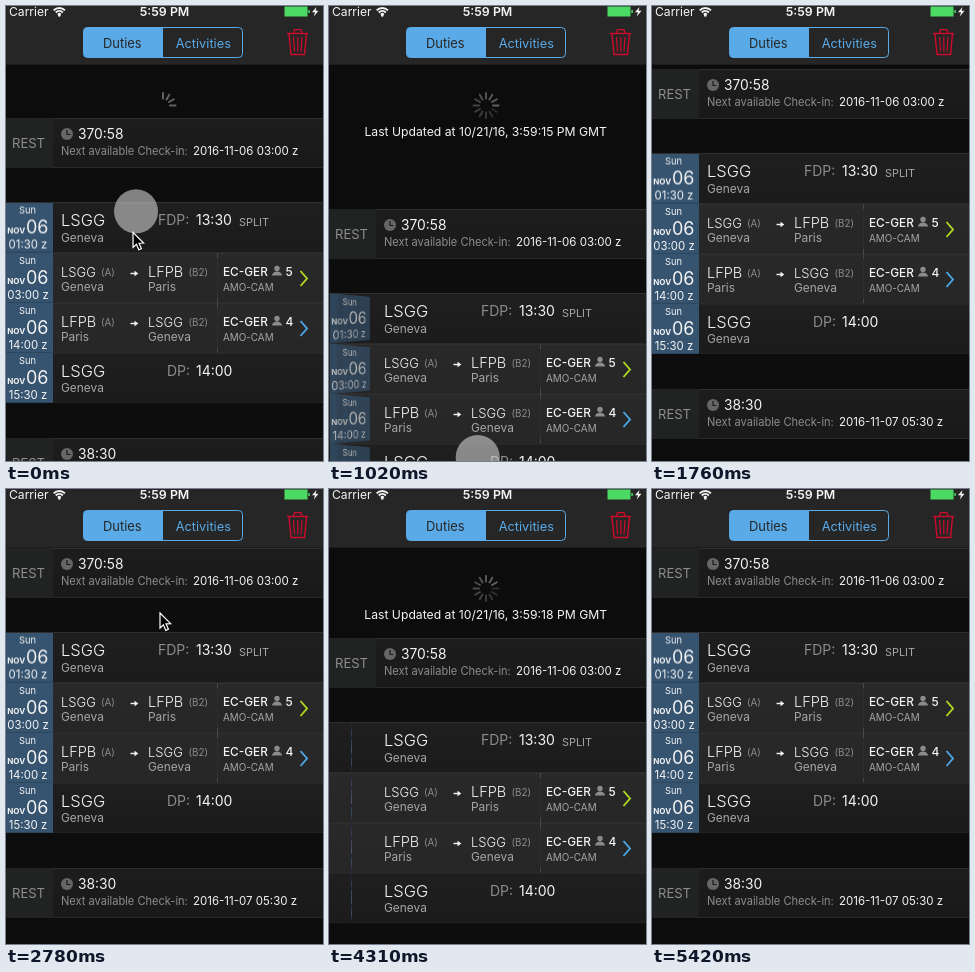
Recreate the animation shown at these times as an HTML page with a canvas. Size 317 by 455 pixels, loop 5960 ms.

```html
<!DOCTYPE html>
<html lang="en">
<head>
<meta charset="utf-8">
<title>Duties</title>
<style>
  html, body { margin: 0; width: 100%; height: 100%; overflow: hidden; background: #0c0c0c; }
  canvas { display: block; width: 317px; height: 455px; }
</style>
</head>
<body>
<canvas id="stage"></canvas>
<script>
const W = 317, H = 455, LOOP = 5960, TOP = 59;
const FONT = 'Inter, Roboto, "Liberation Sans", sans-serif';
const BLUE = '#5aaae7', WHITE = '#f4f4f4', GRAY = '#8c8c8c', SOFT = '#a6a6a6';
const BADGE_W = 47, BADGE_H = 50, AXIS = 22.5;
const dpr = Math.max(1, window.devicePixelRatio || 1);

function makeCanvas(el, w, h) {
  el.width = w * dpr;
  el.height = h * dpr;
  const c = el.getContext('2d');
  c.scale(dpr, dpr);
  return c;
}
const stage = makeCanvas(document.getElementById('stage'), W, H);
let g = stage;

// ---- drawing helpers ----
function text(s, x, y, size, color = WHITE, weight = 400, align = 'left') {
  g.font = `${weight} ${size}px ${FONT}`;
  g.fillStyle = color;
  g.textAlign = align;
  g.fillText(s, x, y);
}
function box(x, y, w, h, color) {
  g.fillStyle = color;
  g.fillRect(x, y, w, h);
}
function trace(points, closed) {
  g.beginPath();
  points.forEach(([x, y], i) => i ? g.lineTo(x, y) : g.moveTo(x, y));
  if (closed) g.closePath();
}
function line(points, color, width) {
  trace(points);
  g.strokeStyle = color;
  g.lineWidth = width;
  g.stroke();
}
function disc(x, y, r, color) {
  g.beginPath();
  g.arc(x, y, r, 0, Math.PI * 2);
  g.fillStyle = color;
  g.fill();
}

// ---- motion ----
const clamp = v => Math.min(1, Math.max(0, v));
const smooth = u => u * u * (3 - 2 * u);
const rubber = d => { const k = d * 0.55 / 396; return 396 * k / (1 + k); };
const settle = dt => (1 + 0.0105 * dt) * Math.exp(-0.0105 * dt);

const pulls = [
  { start: 0, end: 1245, spin: 690, flip: 920, from: 111, span: 321,
    ease: u => 1 - Math.pow(1 - u, 1.6),
    touch: p => [130 + 20 * p, 205 + 263 * p],
    arrow: p => [127 + 20 * p, 226 + 310 * p] },
  { start: 3450, begin: 3500, end: 4200, spin: 4100, flip: 4100, from: 0, span: 364,
    ease: u => Math.pow(u, 1.72),
    touch: p => [159 + 15 * p, 100 + 325 * p],
    arrow: p => [157 + 15 * p, 100 + 417 * p] }
];
const FLIP_TIME = 420;

function progress(pull, t) {
  const begin = pull.begin || pull.start;
  return pull.ease(clamp((t - begin) / (pull.end - begin)));
}
function offsetAt(pull, t) {
  const d = rubber(pull.from + pull.span * progress(pull, t));
  return t > pull.end ? d * settle(t - pull.end) : d;
}

// time, x, y of the free pointer
const path = [
  [1790, 172, 458], [1880, 168, 408], [2000, 164, 379], [2180, 164, 379],
  [2360, 144, 213], [2540, 144, 213], [2780, 154, 124], [3140, 154, 124],
  [3320, 157, 100], [3500, 157, 100]
];
function pointerAt(t, pull) {
  if (t >= 5040 && t < 5420) return [198, 444];
  if (t >= (pull.begin || pull.start) && t < pull.end) return pull.arrow(progress(pull, t));
  for (let i = 1; i < path.length; i++) {
    const [t0, x0, y0] = path[i - 1], [t1, x1, y1] = path[i];
    if (t >= t0 && t < t1) {
      const u = (t - t0) / (t1 - t0);
      return [x0 + (x1 - x0) * u, y0 + (y1 - y0) * u];
    }
  }
  return null;
}

// ---- date badges ----
const badges = ['01:30 z', '03:00 z', '14:00 z', '15:30 z'].map(time => {
  const el = document.createElement('canvas');
  return { el, time, ctx: makeCanvas(el, BADGE_W, BADGE_H) };
});
function paintBadges() {
  for (const b of badges) {
    g = b.ctx;
    box(0, 0, BADGE_W, BADGE_H, '#365470');
    box(0, BADGE_H - 1, BADGE_W, 1, '#2c465e');
    text('Sun', 21.5, 10.7, 9.3, WHITE, 400, 'center');
    text('NOV', 1.2, 31, 8, WHITE, 700);
    text('06', 20, 31, 18, WHITE, 400);
    text(b.time, 22, 45.5, 11.4, WHITE, 400, 'center');
  }
  g = stage;
}

// Y-axis flip, drawn as thin vertical strips
function badge(i, y, angle) {
  const { el } = badges[i];
  if (!angle) {
    g.drawImage(el, 0, y, BADGE_W, BADGE_H);
    return;
  }
  const a = angle > Math.PI / 2 ? angle - Math.PI : angle;
  const sin = Math.sin(a), cos = Math.cos(a);
  const scale = 1 - 0.15 * Math.abs(sin);
  const depth = v => scale / (1 + v * sin / 130);
  g.save();
  g.beginPath();
  g.rect(0, y, BADGE_W, BADGE_H);
  g.clip();
  g.globalAlpha = 1 - 0.5 * Math.abs(sin);
  for (let c = 0; c < BADGE_W; c++) {
    const v = c - BADGE_W / 2, h = BADGE_H * depth(v + 0.5);
    const x0 = AXIS + v * cos * depth(v), x1 = AXIS + (v + 1) * cos * depth(v + 1);
    g.drawImage(el, c * dpr, 0, dpr, el.height, x0, y + (BADGE_H - h) / 2, Math.max(x1 - x0, 0.04), h);
  }
  g.restore();
}

// ---- rows ----
function rowBack(y, h, top, bottom) {
  const fill = g.createLinearGradient(0, y, 0, y + h);
  fill.addColorStop(0, top);
  fill.addColorStop(1, bottom);
  box(0, y, W, h, fill);
  box(0, y, W, 1, '#2f2f2f');
  box(0, y + h - 1, W, 1, '#2a2a2a');
}
function restRow(y, hours, next) {
  rowBack(y, 50, '#1d1d1d', '#191919');
  box(0, y, 47, 50, '#212323');
  text('REST', 22.5, y + 29.5, 13.1, GRAY, 400, 'center');
  disc(61, y + 16, 6, '#666');
  line([[61, y + 12], [61, y + 16.5], [64.5, y + 16.5]], '#1c1c1c', 1.2);
  text(hours, 72, y + 21, 13.8);
  text('Next available Check-in:', 55, y + 36.5, 11.05, GRAY);
  text(next, 187, y + 36.5, 11.5);
}
function dutyRow(y, label, labelX, time, note) {
  rowBack(y, 51, '#1f1f1f', '#1b1b1b');
  text('LSGG', 55, y + 24, 16.5, WHITE, 300);
  text('Geneva', 55, y + 39.5, 11.9, SOFT);
  text(label, labelX, y + 23.2, 14, GRAY);
  text(time, 190, y + 23.2, 14);
  text(note, 233, y + 23.5, 10.9, SOFT);
}
function airport(x, y, code, city, tag, tagX) {
  text(code, x, y + 24, code === 'LSGG' ? 13 : 14.5, WHITE, 300);
  text(tag, tagX, y + 23, 9.8, GRAY);
  text(city, x, y + 38.2, 11.9, SOFT);
}
function person(x, y) {
  disc(x, y, 2.7, GRAY);
  g.beginPath();
  g.ellipse(x, y + 7, 5, 4, 0, Math.PI, 0);
  g.fill();
}
function legRow(y, from, to, seats, color) {
  rowBack(y, 50, '#292929', '#262626');
  airport(55, y, ...from, '(A)', 95);
  airport(142, y, ...to, '(B2)', 182.5);
  line([[124.5, y + 20.5], [130, y + 20.5]], WHITE, 1.4);
  trace([[128.5, y + 17.7], [132.3, y + 20.5], [128.5, y + 23.3]], true);
  g.fillStyle = WHITE;
  g.fill();
  box(211, y, 1, 50, '#2e2e2e');
  box(211, y, 1, 5, '#484848');
  box(211, y + 45, 1, 5, '#484848');
  text('EC-GER', 217, y + 23, 11.8, WHITE, 500);
  person(271, y + 15.5);
  text(seats, 279.5, y + 23, 12, WHITE, 500);
  text('AMO-CAM', 217, y + 38.3, 9.9, SOFT);
  line([[294.5, y + 18], [301, y + 25.5], [294.5, y + 33]], color, 1.9);
}
function list(off, angle) {
  const geneva = ['LSGG', 'Geneva'], paris = ['LFPB', 'Paris'];
  restRow(59 + off, '370:58', '2016-11-06 03:00 z');
  box(0, 109 + off, W, 34, '#0d0d0d');
  dutyRow(143 + off, 'FDP:', 152, '13:30', 'SPLIT');
  legRow(194 + off, geneva, paris, '5', '#b0d820');
  legRow(244 + off, paris, geneva, '4', '#4aa6e4');
  dutyRow(293.5 + off, 'DP:', 161, '14:00', '');
  badges.forEach((b, i) => badge(i, (i ? 144 + 50 * i : 143.5) + off, angle));
  box(0, 344 + off, W, 35, '#0d0d0d');
  restRow(379 + off, '38:30', '2016-11-07 05:30 z');
}

// ---- refresh control ----
function refresher(off, t, pull) {
  const spinning = t >= pull.spin;
  const count = spinning ? 12 : Math.floor(4.7 + (off - 53) * 0.1);
  const head = Math.floor((t - pull.spin) / 83.3);
  g.lineCap = 'round';
  for (let i = 0; i < count; i++) {
    const a = i * Math.PI / 6, s = Math.sin(a), c = -Math.cos(a);
    const age = ((head - i) % 12 + 12) % 12;
    const alpha = spinning ? 0.62 - 0.035 * age : 0.62;
    line([[157 + 7 * s, 99.5 + 7 * c], [157 + 12.5 * s, 99.5 + 12.5 * c]], `rgba(150,150,156,${alpha})`, 2);
  }
  g.lineCap = 'butt';
  const second = t >= pulls[1].spin ? 18 : 15;
  text(`Last Updated at 10/21/16, 3:59:${second} PM GMT`, 156.7, 130, 12.2, WHITE, 400, 'center');
}

// ---- top bar ----
function wifi(x, y) {
  for (const r of [2, 5, 8]) {
    g.beginPath();
    g.arc(x, y, r, -Math.PI * 0.75, -Math.PI * 0.25);
    g.strokeStyle = WHITE;
    g.lineWidth = 1.9;
    g.stroke();
  }
  disc(x, y - 0.6, 1.3, WHITE);
}
function trash() {
  const red = '#cf0a2c';
  line([[281, 27.5], [302, 27.5]], red, 1.4);
  line([[287.5, 27], [288.5, 23.7], [295, 23.7], [296, 27]], red, 1.3);
  line([[283, 28], [285, 48.5], [298.5, 48.5], [300.5, 28]], red, 1.4);
  line([[287.5, 31], [288.5, 45.5]], red, 1.2);
  line([[291.8, 31], [291.8, 45.5]], red, 1.2);
  line([[296, 31], [295, 45.5]], red, 1.2);
}
function topBar() {
  box(0, 0, W, TOP, '#262626');
  box(0, TOP - 1, W, 1, '#1c1c1c');
  text('Carrier', 3, 10, 12.1);
  wifi(53.3, 10);
  text('5:59 PM', 158.5, 10, 12.4, WHITE, 600, 'center');
  box(278.5, 0.5, 23, 10, '#4cd964');
  box(302.3, 4, 1.5, 3, '#4cd964');
  trace([[310.5, 1], [306, 6.2], [309, 6.2], [307.8, 10.5], [312.5, 4.8], [309.6, 4.8]], true);
  g.fillStyle = WHITE;
  g.fill();

  g.save();
  g.beginPath();
  g.roundRect(77.5, 21.5, 159, 30, 4);
  g.strokeStyle = BLUE;
  g.lineWidth = 1;
  g.stroke();
  g.clip();
  box(77, 21, 80, 32, BLUE);
  g.restore();
  text('Duties', 116.3, 41.5, 12.9, '#262626', 400, 'center');
  text('Activities', 197.3, 41.5, 12.8, BLUE, 400, 'center');
  trash();
}

function arrow([x, y]) {
  trace([[0, 0], [0, 15], [3.4, 11.8], [5.8, 17.4], [8.4, 16.3], [6, 10.8], [10.6, 10.6]]
    .map(([dx, dy]) => [x + dx, y + dy]), true);
  g.fillStyle = '#000';
  g.fill();
  g.strokeStyle = '#fff';
  g.lineWidth = 1.2;
  g.stroke();
}

function draw(t) {
  const pull = pulls[t < pulls[1].start ? 0 : 1];
  const off = Math.round(offsetAt(pull, t));
  const turn = clamp((t - pull.flip) / FLIP_TIME);
  const angle = turn < 1 ? smooth(turn) * Math.PI : 0;

  box(0, 0, W, H, '#0c0c0c');
  if (off > 0) refresher(off, t, pull);
  list(off, angle);
  topBar();

  const fadeIn = pull.begin ? clamp((t - pull.start) / 100) : 1;
  const shown = fadeIn * clamp(1 - (t - pull.end) / 100);
  if (shown > 0) disc(...pull.touch(progress(pull, t)), 22, `rgba(225,225,225,${0.55 * shown})`);
  const tip = pointerAt(t, pull);
  if (tip) arrow(tip);
}

function tick() {
  draw(performance.now() % LOOP);
  requestAnimationFrame(tick);
}
paintBadges();
tick();
</script>
</body>
</html>
```
